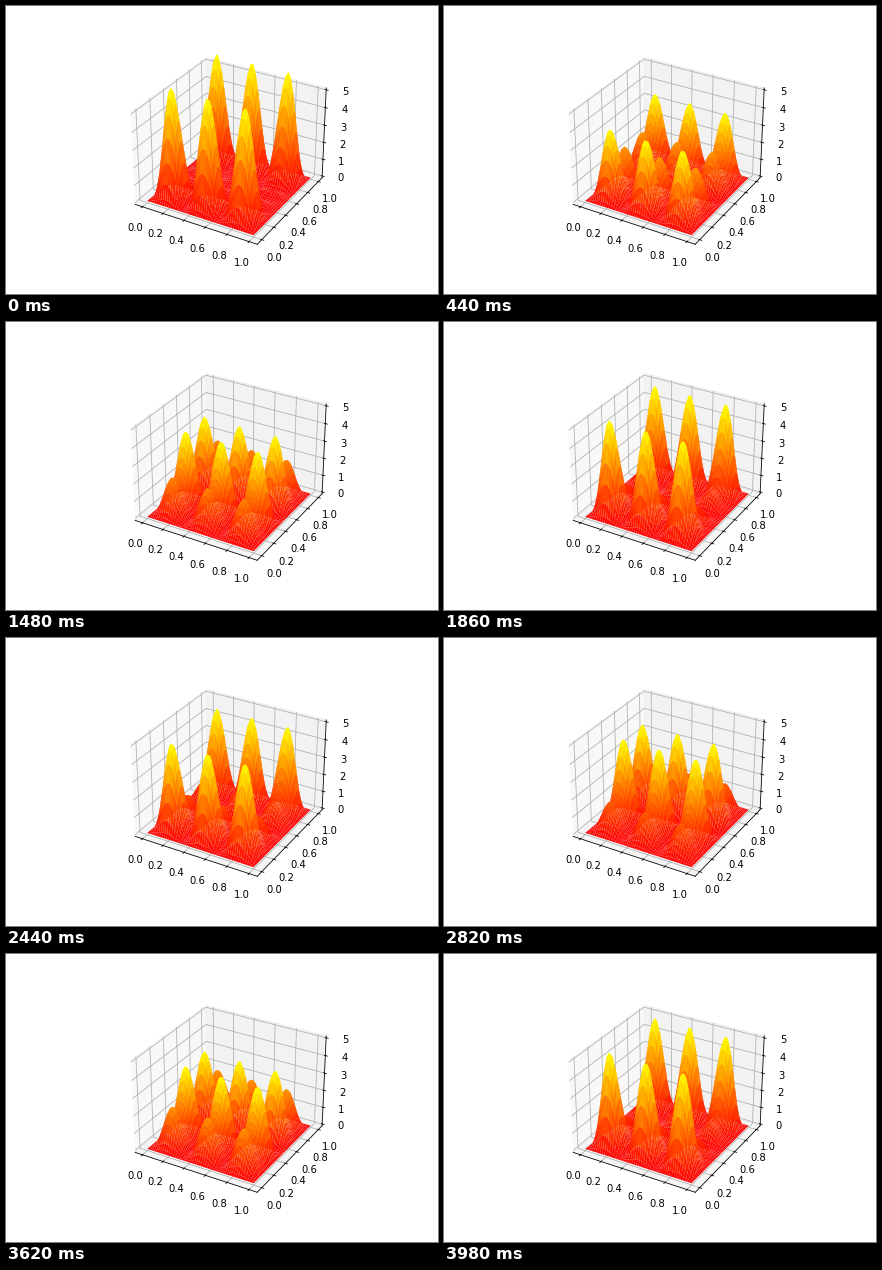
Write a matplotlib script that moves like this. It is 432x288 px and loops after 4000 ms.

```python
import numpy as np
import matplotlib.pyplot as plt
from matplotlib.animation import FuncAnimation
from matplotlib.collections import QuadMesh
from mpl_toolkits.mplot3d import proj3d

FRAMES, INTERVAL = 200, 20
DT = 0.001      # simulated time per frame, with hbar = m = L = 1
N = 50          # grid points per side

plt.rcParams["axes3d.automargin"] = True

# Rows run from the far edge to the near one, so cells paint back to front.
axis = np.linspace(0, 1, N)
X, Y = np.meshgrid(axis, axis[::-1])


def state(nx, ny, t):
    """Stationary state of the unit square box at time t."""
    energy = (nx**2 + ny**2) * np.pi**2 / 2
    wave = 2 * np.sin(nx * np.pi * X) * np.sin(ny * np.pi * Y)
    return wave * np.exp(-1j * energy * t)


def density(t):
    psi = (state(3, 2, t) + state(3, 4, t)) / np.sqrt(2)
    return np.abs(psi) ** 2


fig = plt.figure(figsize=(6, 4), dpi=72)
fig.subplots_adjust(left=0.125, right=0.9, bottom=0.125, top=0.88)
box = fig.add_subplot(projection="3d")
box.set(xlim=(-0.05, 1.05), ylim=(-0.05, 1.05), zlim=(0, 5))

# The box never changes: render it once and keep it as the backdrop.
fig.canvas.draw()
backdrop = np.array(fig.canvas.buffer_rgba())
view = box.get_proj()
to_pixels = box.transData.frozen()
box.set_visible(False)
fig.figimage(backdrop, origin="upper", zorder=-1)

stage = fig.add_axes([0, 0, 1, 1])
stage.set(xlim=(0, 432), ylim=(0, 288))
stage.axis("off")
meshes = []


def project(Z):
    """Pixel positions of the surface points."""
    u, v, _ = proj3d.proj_transform(X.ravel(), Y.ravel(), Z.ravel(), view)
    points = to_pixels.transform(np.column_stack([u, v]))
    return points.reshape(N, N, 2)


def update(i):
    while meshes:
        meshes.pop().remove()
    Z = density(i * DT)
    height = (Z[:-1, :-1] + Z[:-1, 1:] + Z[1:, 1:] + Z[1:, :-1]) / 4
    mesh = QuadMesh(project(Z), array=height, cmap="autumn",
                    antialiased=True, edgecolors="none", linewidth=0)
    stage.add_collection(mesh, autolim=False)
    meshes.append(mesh)
    return meshes


anim = FuncAnimation(fig, update, frames=FRAMES, interval=INTERVAL,
                     init_func=lambda: update(0), repeat=True, repeat_delay=0)
plt.show()
```
